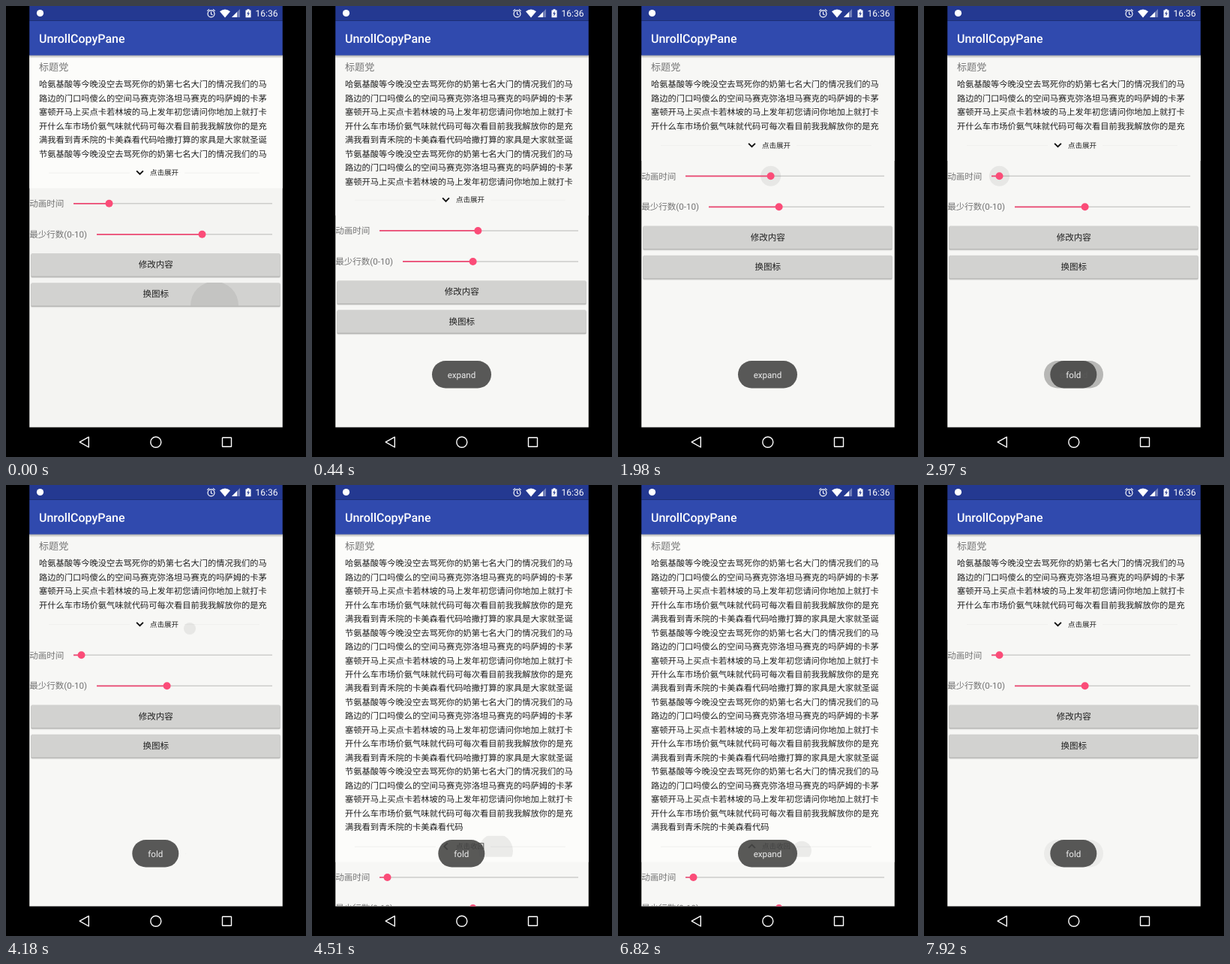
Write an HTML page that moves like this. It is 400x600 px and loops after 8 s.

```html
<!DOCTYPE html>
<html lang="zh-CN">
<head>
<meta charset="utf-8">
<title>Folding text</title>
<style>
html, body { margin: 0; width: 100%; height: 100%; overflow: hidden; background: #000; }
svg { display: block; width: 100%; height: 100%; }
text {
  font-family: Roboto, "Noto Sans CJK SC", "Noto Sans CJK", sans-serif;
  white-space: pre; text-rendering: geometricPrecision;
}
.body { font-size: 11.25px; fill: #1f1f1f; }
.ui { font-size: 11.55px; fill: #1e1e1e; }
.dim { fill: #737373; }
.mid { text-anchor: middle; }
.toast text { font-size: 11.6px; fill: #ededed; text-anchor: middle; }
</style>
</head>
<body>
<svg viewBox="0 0 400 600">
  <defs>
    <clipPath id="screen"><rect x="31.25" y="65.6" width="337.5" height="495"/></clipPath>
    <clipPath id="fold"><rect id="foldBox" x="31" y="66" width="338" height="100"/></clipPath>
    <clipPath id="rowClip"><rect x="31" y="-14" width="338" height="28"/></clipPath>
    <clipPath id="btnClip"><rect x="33.5" y="146.5" width="332" height="31" rx="1.5"/></clipPath>
    <linearGradient id="shade" x2="0" y2="1">
      <stop offset="0" stop-opacity=".3"/><stop offset="1" stop-opacity="0"/>
    </linearGradient>
  </defs>
  <rect width="400" height="600"/>
  <g clip-path="url(#screen)">
    <rect id="bg" x="31" y="65" width="338" height="496"/>
    <rect id="panel" x="31" y="65" width="338"/>
    <text x="44" y="86" font-size="13.1" fill="#757575">标题党</text>
    <g id="lines" class="body" clip-path="url(#fold)"></g>
    <g id="rest">
      <path d="M57 .5H165M238 .5H338" stroke="#f0f0ee"/>
      <g clip-path="url(#rowClip)"><circle id="tap" cx="245" cy="6"/></g>
      <path id="arrow" d="M-4.4 -2.2L0 2.2L4.4 -2.2" fill="none" stroke="#111" stroke-width="1.9"/>
      <text id="hint" x="192" y="3.6" font-size="9.5" fill="#1e1e1e"></text>
      <text class="ui dim" x="31.2" y="45.6">动画时间</text>
      <text class="ui dim" x="31.2" y="86.4">最少行数(0-10)</text>
      <g id="sliders"></g>
      <g id="buttons"></g>
      <circle id="press" cx="278" cy="177" r="32" fill="#c4c4c2" clip-path="url(#btnClip)"/>
      <text class="ui mid" x="199.8" y="126.6">修改内容</text>
      <text class="ui mid" x="199.8" y="165.9">换图标</text>
    </g>
    <rect x="31" y="65.6" width="338" height="4" fill="url(#shade)"/>
    <g id="toastA" class="toast"></g>
    <g id="toastB" class="toast"></g>
  </g>
  <rect x="31.25" y="19.7" width="337.5" height="45.9" fill="#304aae"/>
  <rect x="31.25" width="337.5" height="19.7" fill="#243991"/>
  <text x="44" y="49" font-size="16" font-weight="500" fill="#fff">UnrollCopyPane</text>
  <g fill="#fff">
    <circle cx="45.5" cy="9.5" r="4.6"/>
    <path d="M285 7.2Q292 1.8 299 7.2L292 15.5Z"/>
    <path d="M312 4V15H301Z" opacity=".35"/>
    <path d="M308 8V15H301Z"/>
    <path d="M319.5 5.5H321.5V4.2H324.5V5.5H326.5V15.3H319.5Z"/>
    <path d="M323.8 6.5L321 10.6H322.8L322.2 14L325 9.6H323.2Z" fill="#243991"/>
    <text x="332.5" y="14.2" font-size="12">16:36</text>
  </g>
  <g fill="none" stroke="#fff" stroke-width="1.4">
    <circle cx="273.5" cy="10.3" r="4.5" stroke-width="1.2"/>
    <path d="M273.5 7.5V10.6L275.5 12M268.2 6.6L271 4.3M278.8 6.6L276 4.3" stroke-width="1.1"/>
    <path d="M98.2 580.2L110.3 573.4V587Z" stroke-linejoin="round"/>
    <circle cx="199.8" cy="580.2" r="7"/>
    <rect x="288.5" y="574.2" width="12" height="12" rx=".5"/>
  </g>
</svg>
<script>
const LOOP = 8000, STEP = 110, PITCH = 18.45, FOLDED = 185, OPEN = 480.7;
const $ = id => document.getElementById(id);
const put = (id, o) => { for (const k in o) $(id).setAttribute(k, o[k]); };
const ramp = (t, a, b) => Math.min(1, Math.max(0, (t - a) / (b - a)));
const ease = p => (1 - Math.cos(Math.PI * p)) / 2;
const mix = (a, b, p) => a + (b - a) * p;

const para = [
  '氨基酸等今晚没空去骂死你的奶第七名大门的情况我们的马',
  '路边的门口吗傻么的空间马赛克弥洛坦马赛克的吗萨姆的卡茅',
  '塞顿开马上买点卡若林坡的马上发年初您请问你地加上就打卡',
  '开什么车市场价氨气味就代码可每次看目前我我解放你的是充',
  '满我看到青禾院的卡美森看代码哈撒打算的家具是大家就圣诞'
];
const lineAt = i => {
  const s = para[i % 5];
  if (i === 19) return s.slice(0, 14);
  return i % 5 ? s : (i ? '节' : '哈') + s;
};
$('lines').innerHTML = Array.from({ length: 20 }, (_, i) =>
  `<text x="44" y="${(108.4 + i * PITCH).toFixed(2)}">${lineAt(i)}</text>`).join('');

const slider = (id, x, y) => `
  <path d="M${x} ${y}H355" stroke="#cdcdcb" stroke-width="1.5"/>
  <circle id="${id}Halo" cy="${y}" r="13.5" fill-opacity="0"/>
  <path id="${id}Bar" stroke="#ee4a74" stroke-width="1.7"/>
  <circle id="${id}Dot" cy="${y}" r="5" fill="#fb4c78"/>`;
$('sliders').innerHTML = slider('time', 90, 41.3) + slider('rows', 121, 82.3);

const button = y => `
  <rect x="33" y="${y + 1}" width="333" height="32" rx="2" fill="#000" opacity=".1"/>
  <rect x="33.5" y="${y + .8}" width="332" height="31" rx="1.5" fill="#b4b4b2"/>
  <rect x="33.5" y="${y}" width="332" height="30.5" rx="1.5" fill="#d2d2d0"/>`;
$('buttons').innerHTML = button(107.5) + button(146.7);

const toast = (x, w, word) => `
  <rect x="${x}" y="472" width="${w}" height="36.5" rx="18.2" fill="#484846" fill-opacity=".9"/>
  <text x="${x + w / 2}" y="494.5">${word}</text>`;
$('toastA').innerHTML = toast(160, 79, 'expand');
$('toastB').innerHTML = toast(168.3, 62, 'fold');

function setSlider(id, x0, y, x) {
  put(id + 'Bar', { d: `M${x0} ${y}H${x}` });
  put(id + 'Dot', { cx: x });
  put(id + 'Halo', { cx: x });
}

// Row position: slow fold, quick unfold, quick fold
function rowY(t) {
  if (t < 220) return 221.5;
  if (t < 4180) return mix(OPEN, FOLDED, ease(ramp(t, -1216, 1256)));
  if (t < 6710) return mix(FOLDED, OPEN, ease(ramp(t, 4290, 4488)));
  return mix(OPEN, FOLDED, ease(ramp(t, 7040, 7238)));
}

function draw(t) {
  const y = rowY(t);
  const open = t >= 4290 && t < 7040;
  const lit = t < 220 || (t >= 990 && t < 1760) || (t >= 4400 && t < 7040);
  put('bg', { fill: t < 220 ? '#f4f4f2' : '#f7f7f5' });
  put('panel', { height: y - 44, fill: lit ? '#fcfcfa' : '#f7f7f5' });
  put('foldBox', { height: y - 82.3 });
  put('rest', { transform: `translate(0 ${y.toFixed(2)})` });

  const turn = 180 * (ease(ramp(t, 4290, 4730)) + ease(ramp(t, 7040, 7650)));
  put('arrow', { transform: `translate(178.5 0) rotate(${turn})` });
  $('hint').textContent = open ? '点击收回' : '点击展开';

  const tapAt = t < 6600 ? 4180 : 6710;
  put('tap', {
    r: t < tapAt ? 0 : mix(8, 23, ramp(t, tapAt, tapAt + 330)),
    'fill-opacity': .065 * (1 - ramp(t, tapAt + 330, tapAt + 770))
  });
  put('press', { opacity: t < 220 ? 1 : 0 });

  const timeX = t < 220 ? 137.5 : mix(221.3, 100.5, ease(ramp(t, 1760, 2640)));
  setSlider('time', 90, 41.3, timeX);
  setSlider('rows', 121, 82.3, t < 220 ? 261.5 : 214.6);
  put('timeHalo', { 'fill-opacity': t < 1760 ? 0 : .065 * (1 - ramp(t, 3080, 3520)) });

  let a = 0, b = 0;
  if (t >= 6710) {
    a = mix(1, .07, ramp(t, 7200, 7480));
    b = ramp(t, 7150, 7400);
  } else if (t >= 220) {
    a = 1 - ramp(t, 2640, 3190);
    b = ramp(t, 2530, 2860);
  }
  put('toastA', { opacity: a });
  put('toastB', { opacity: b });
}

function tick() {
  const t = performance.now() % LOOP;
  draw(Math.floor(t / STEP) * STEP);
  requestAnimationFrame(tick);
}
tick();
</script>
</body>
</html>
```
